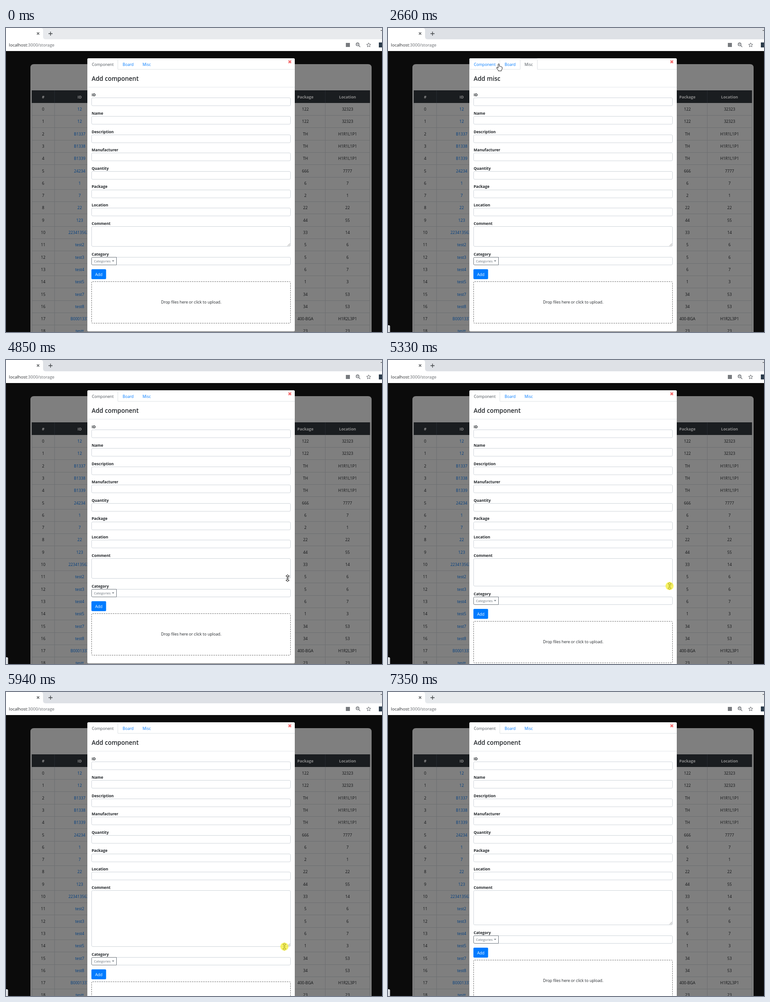
An HTML page for the animation above (7.44 s loop, 832x673 px).

```html
<!DOCTYPE html>
<html lang="en">
<head>
<meta charset="utf-8">
<title>Storage</title>
<style>
html, body { margin: 0; width: 100%; height: 100%; overflow: hidden; background: #0b0b0b; }
svg { display: block; width: 832px; height: 673px; }
text { font: 8.7px "Open Sans", "Noto Sans", sans-serif; fill: #212529; }
.mid { text-anchor: middle; }
.bold { font-weight: 700; font-size: 8.5px; }
.head { font-weight: 700; fill: #8c8c8c; }
.cell { fill: #101214; }
.id { fill: #003e80; }
.tab { fill: #007bff; }
.tab.on { fill: #495057; }
.field { fill: #fff; stroke: #ced4da; }
.icon { fill: none; stroke: #5f6368; stroke-width: 1.3; }
.pointer { fill: #fff; stroke: #000; stroke-width: .9; stroke-linejoin: round; }
#title { font-size: 13.5px; font-weight: 600; }
#url { font-size: 9.5px; fill: #27292c; }
</style>
</head>
<body>
<svg viewBox="0 0 832 673" xmlns="http://www.w3.org/2000/svg">
  <rect width="832" height="673" fill="#0b0b0b"/>
  <rect id="strip" width="832" height="25"/>
  <path d="M0 0H77Q82 0 82 5V19Q82 25 88 25H0Z" fill="#fff"/>
  <path d="M68.5 9.8l5 5m0-5l-5 5M94 12.5h9M98.5 8v9" fill="none" stroke="#3c4043" stroke-width="1.3"/>
  <path d="M829 5.5h3" stroke="#333"/>
  <rect y="25" width="832" height="26" fill="#fff"/>
  <text id="url" x="6.5" y="40.8">localhost<tspan fill="#66696d">:3000/storage</tspan></text>
  <rect x="752" y="33" width="9" height="9" fill="#777a7e"/>
  <g class="icon">
    <circle cx="778" cy="36.2" r="3.2"/>
    <path d="M780.5 38.7l3.3 3.4M776.5 36.2h3"/>
    <path d="M802.5 32.8l1.3 3.1 3.4.3-2.6 2.2.8 3.3-2.9-1.8-2.9 1.8.8-3.3-2.6-2.2 3.4-.3z" stroke-width="1"/>
  </g>
  <rect x="825" y="32" width="7" height="11" fill="#2b3b4b"/>

  <path d="M54 673V88Q54 80 62 80H801Q809 80 809 88V673Z" fill="#7f7f7f"/>
  <g id="table"></g>
  <path id="status" d="M0 658H2Q4.5 658 4.5 660.5V673H0Z" fill="#dee1e6"/>

  <rect id="modal" x="180" y="67" width="459" rx="2.5" fill="#fff"/>
  <path d="M181 131H639" stroke="#e3e6ea"/>
  <path id="tabLine" fill="none" stroke="#dee2e6"/>
  <path id="hoverLine" fill="none" stroke="#e9ecef"/>
  <g id="tabs"></g>
  <path d="M625.2 72l5.6 5.6m0-5.6l-5.6 5.6" stroke="#f4696b" stroke-width="2.4"/>
  <text id="title" x="189.5" y="116.8"></text>
  <g id="fields"></g>
  <rect id="area" class="field" x="189.5" y="439.5" width="440" rx="2.4"/>
  <g id="lower">
    <path d="M623 482.5l5.5-5.5M626 482.5l2.5-2.5" stroke="#777" stroke-width=".8"/>
    <text class="bold" x="189.5" y="504">Category</text>
    <rect class="field" x="189.5" y="507.5" width="440" height="17" rx="2.4"/>
    <path d="M244.5 507.5H191.5Q189.5 507.5 189.5 509.5V522Q189.5 524.5 191.5 524.5H244.5Z" fill="#fff" stroke="#6c757d"/>
    <text x="194.5" y="518.7" style="font-size:7.5px;fill:#6c757d">Categories</text>
    <path d="M234.5 514.5h5l-2.5 2.7z" fill="#6c757d"/>
    <rect x="189" y="534" width="32.5" height="22" rx="2" fill="#007bff"/>
    <text class="mid" x="205.3" y="548.6" style="fill:#fff">Add</text>
    <rect x="189.5" y="561.5" width="440" height="92" rx="2" fill="#fff" stroke="#6a6a6a" stroke-dasharray="3 2"/>
    <text class="mid" x="409.7" y="609.8">Drop files here or click to upload.</text>
  </g>

  <g id="cursor">
    <path id="arrow" class="pointer" d="M0 0V12l2.8-2.5 1.8 4 2-.9-1.8-3.9H8.5Z"/>
    <path id="hand" class="pointer" d="M-1.3 1Q0-.8 1.3 1V6l1-.6 1 .9 1-.4 1 .9 1.3-.1 1 1.2V11.5L6 14.5V16H-1V14.5L-4.8 9.5Q-4.8 7.6-3 8.2L-1.3 9.8Z"/>
    <path id="beam" d="M-2.5-5.5H-.7L0-5 .7-5.5H2.5M0-5V5M-2.5 5.5H-.7L0 5 .7 5.5H2.5" fill="none" stroke="#222" stroke-width="1.1"/>
    <path id="resize" class="pointer" stroke-width=".8" d="M0-8L3.8-4.5H1V4.5H3.8L0 8-3.8 4.5H-1V-4.5H-3.8Z"/>
    <circle id="press" r="9" fill="#f5ee20" fill-opacity=".68"/>
  </g>
</svg>
<script>
const LOOP = 7440, STEP = 78;
const $ = id => document.getElementById(id);
const show = (id, on) => { $(id).style.display = on ? '' : 'none'; };
const clamp = u => Math.min(1, Math.max(0, u));
const ease = u => (1 - Math.cos(Math.PI * clamp(u))) / 2;
const mix = (a, b, u) => a + (b - a) * u;

function add(parent, tag, attrs, content = '') {
  const el = document.createElementNS('http://www.w3.org/2000/svg', tag);
  for (const name in attrs) el.setAttribute(name, attrs[name]);
  el.textContent = content;
  return parent.appendChild(el);
}
const label = (parent, x, y, cls, content) => add(parent, 'text', { x, y, class: cls }, content);

function buildTable() {
  const table = $('table');
  const rows = `12 122 32323,12 122 32323,B1337 TH H1R1L1P1,B1338 TH H1R1L1P1,B1339 TH H1R1L1P1,
    24234 666 7777,1 6 7,7 2 1,22 22 22,123 44 55,2234135635 33 14,test2 5 6,test3 5 6,test4 6 7,
    test5 1 3,test7 34 53,test8 34 53,B0001337 400-BGA H1R2L3P1,testt 23 23`.split(',');
  const columns = [82.3, 163, 662.5, 755.8];
  let lines = 'M57.5 166V673M107.5 166V673M706.5 166V673M805 166V673';
  add(table, 'rect', { x: 57, y: 138, width: 748.5, height: 28, fill: '#1a1d20' });
  add(table, 'path', { d: 'M107.5 138V166M706.5 138V166', stroke: '#262a2f' });
  ['#', 'ID', 'Package', 'Location'].forEach((name, k) => label(table, columns[k], 155.8, 'mid head', name));
  rows.forEach((row, i) => {
    const y = 27.3 * i;
    if (i) lines += `M57 ${Math.round(165.7 + y) + .5}H805`;
    [i, ...row.trim().split(' ')].forEach((value, k) =>
      label(table, columns[k], Math.round(183 + y), k === 1 ? 'mid id' : 'mid cell', value));
  });
  add(table, 'path', { d: lines, stroke: '#6d6f71', fill: 'none' });
}

function buildFields() {
  const names = ['ID', 'Name', 'Description', 'Manufacturer', 'Quantity', 'Package', 'Location', 'Comment'];
  names.forEach((name, i) => {
    const y = 40.65 * i;
    label($('fields'), 189.5, Math.round(151.2 + y), 'bold', name);
    if (i < 7) add($('fields'), 'rect', {
      x: 189.5, y: Math.round(154.4 + y) + .5, width: 440, height: 17.5, rx: 2.4, class: 'field'
    });
  });
}

const tabs = [
  { name: 'Component', x: 190, from: 180.5, to: 247.5 },
  { name: 'Board', x: 258, from: 248.5, to: 291.5 },
  { name: 'Misc', x: 302, from: 292.5, to: 330.5 }
];
buildTable();
buildFields();
for (const tab of tabs) tab.el = label($('tabs'), tab.x, 84, 'tab', tab.name);

const enter = 210, leave = 7110, drag = 5000, drop = 6656;
const presses = [[1390, 1470], [2100, 2180], [2970, 3130], [drag, drop]];

// Pointer moves: start, end, destination
const moves = [
  [enter, 450, 396, 307], [760, 1250, 280, 83], [1860, 2020, 314, 83], [2260, 2500, 290, 82],
  [2580, 2660, 245, 79], [2890, 2970, 233, 78], [3280, 3830, 501.5, 511], [4130, 4450, 621, 491],
  [4610, 4850, 623, 483], [drag, drop, 616, 516], [6730, 7040, 789, 560]
];

// Turning points of the resize: time, extra height
const turns = [[5155, 0], [5745, 105], [6240, 30], [6430, 52], [drop, 32.5]];

function growth(t) {
  return turns.reduce((h, [at, to], i) =>
    i ? mix(h, to, ease((t - turns[i - 1][0]) / (at - turns[i - 1][0]))) : to, 0);
}

// Time advances in steps from the start of each move
function stepped(t, from, to) {
  return t >= to ? to : from + Math.floor((t - from) / STEP + .1) * STEP;
}

function pointer(t) {
  let x = 660, y = 640, extra = 0;
  for (const [from, to, toX, toY] of moves) {
    if (t < from) break;
    const s = stepped(t, from, to);
    if (from === drag) {
      extra = growth(s);
      x = mix(x, toX, clamp((s - 5400) / 400));
      y += extra;
    } else {
      const u = ease((s - from + STEP) / (to - from + STEP));
      x = mix(x, toX, u);
      y = mix(y, toY, u);
    }
  }
  return { x, y, extra };
}

function pointerKind(t, x, y) {
  if (y < 91 && x < 331) return 'hand';
  if (t >= 4400 && t < 6700) return 'resize';
  const overRow = y > 154 && y < 417 && (y - 154) % 40.65 < 18;
  const overBox = (y > 439 && y < 484) || (y > 507 && y < 525);
  return t < drag && x < 630 && (overRow || overBox) ? 'beam' : 'arrow';
}

const tabShape = ({ from, to }) =>
  `H${from}V69.5Q${from} 67.5 ${from + 2} 67.5H${to - 2}Q${to} 67.5 ${to} 69.5V91.5`;

function draw(t) {
  const { x, y, extra } = pointer(t);
  const grow = Math.floor(extra);
  const active = t < 1470 || t >= 3130 ? 0 : t < 2180 ? 1 : 2;
  const on = tabs[active];
  const shown = t >= enter && t < leave;

  $('strip').setAttribute('fill', t < 1390 ? '#e8eaed' : t < 7350 ? '#dee1e6' : '#e7eaed');
  show('status', t >= 1390);
  $('title').textContent = 'Add ' + on.name.toLowerCase();

  for (const tab of tabs) tab.el.setAttribute('class', tab === on ? 'tab on' : 'tab');
  $('tabLine').setAttribute('d', active ? `M181 91.5${tabShape(on)}H639` : `M${on.to} 68V91.5H639`);
  const over = shown && y < 91 && tabs.find(tab => x >= tab.from && x <= tab.to);
  $('hoverLine').setAttribute('d', over && over !== on ? `M${over.from} 91.5${tabShape(over)}` : '');

  $('modal').setAttribute('height', 604.5 + grow);
  $('area').setAttribute('height', 44 + grow);
  $('lower').setAttribute('transform', `translate(0 ${grow})`);

  show('cursor', shown);
  $('cursor').setAttribute('transform', `translate(${x.toFixed(1)} ${y.toFixed(1)})`);
  const kind = pointerKind(t, x, y);
  for (const id of ['arrow', 'hand', 'beam', 'resize']) show(id, id === kind);
  show('press', presses.some(([from, to]) => t >= from && t < to));
}

const begin = performance.now();
function tick() {
  draw((performance.now() - begin) % LOOP);
  requestAnimationFrame(tick);
}
draw(0);
requestAnimationFrame(tick);
</script>
</body>
</html>
```
